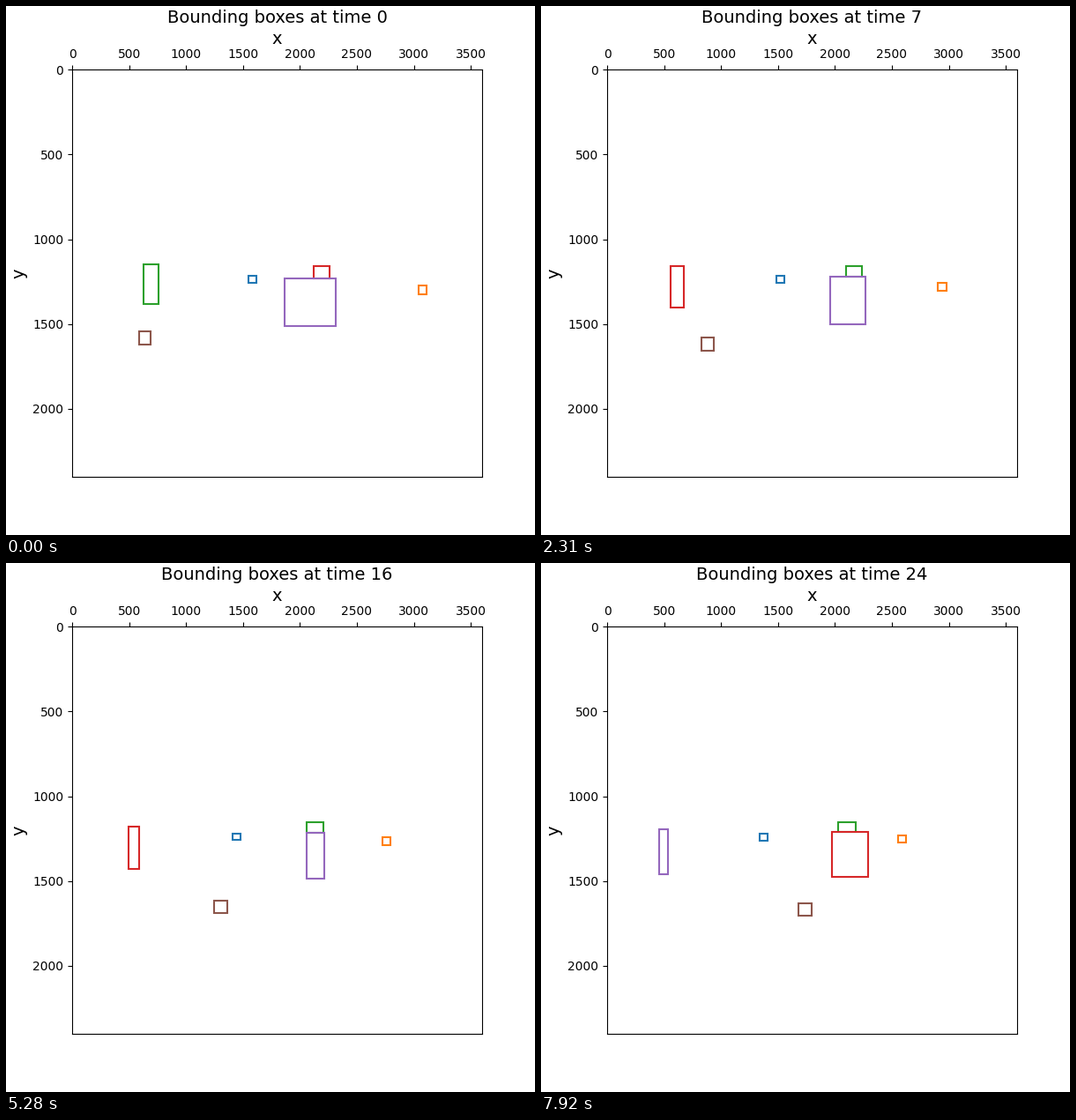
Write a matplotlib script that moves like this. It is 600 px wide and 600 px high and loops after 8 s.

```python
import numpy as np
import matplotlib.pyplot as plt
from matplotlib.animation import FuncAnimation
from matplotlib.patches import Rectangle

STEP_MS = 330      # how long each time step stays
TICK_MS = 40
LOOP_MS = 8000
LAST = 24
W, H = 3600, 2400


def glide(start, end, sag_x, sag_y, u):
    """Box edges (left, right, top, bottom) on an arc from start to end."""
    start, end = np.array(start), np.array(end)
    sag = np.array([sag_x, sag_x, sag_y, sag_y])
    return start + (end - start) * u + 4 * sag * u * (1 - u)


def blue(u):
    return glide((275, 284, 306, 313.8), (247.6, 256.6, 307, 314.8), 0, -0.1, u)


def orange(u):
    return glide((467.8, 477.4, 317.4, 326.6), (404.7, 413.6, 308.9, 317.2),
                 1.1, -0.7, u)


def tall(u):
    return glide((156.2, 173.3, 293.1, 338), (133.6, 144, 302, 352.6),
                 -2.9, -0.55, u)


def brown(u):
    box = glide((150.6, 164.4, 368.6, 384.2), (291.6, 307.4, 385.9, 400.4),
                -10.5, 2.7, u)
    box[:2] -= np.sin(2 * np.pi * u)
    return box


def big(u):
    """Narrows at a steady rate, then widens again as it turns."""
    box = glide((316.4, 374.4, 308.5, 363.4), (356.6, 350.8, 304.6, 356.1),
                0, -0.1, u)
    box[0] = min(box[0], 330 + 33.6 * (1 - u))
    box[1] = max(box[1], 371 - 30 * (1 - u))
    return box


def small(u):
    box = glide((349, 367, 295, 309), (337, 357, 294, 305), 0.1, -0.1, u)
    box[3] = big(u)[2]   # hidden below the big box
    return box


TRACKS = [blue, orange, small, big, tall, brown]


def colors(t):
    """Colour order of small, big and tall changes as their ranks swap."""
    mid = "342" if t < 7 else "243" if t < 18 else "234"
    return ["C" + c for c in "01" + mid + "5"]


fig, ax = plt.subplots(figsize=(6, 6), dpi=100)
ax.set_xlim(0, W)
ax.set_ylim(H, 0)
ax.xaxis.tick_top()
ax.xaxis.set_label_position("top")
ax.set_xlabel("x", fontsize=14)
ax.set_ylabel("y", fontsize=14)
title = ax.set_title("Bounding boxes at time 0", fontsize=14)
rects = [ax.add_patch(Rectangle((0, 0), 1, 1, fill=False, lw=1.5))
         for _ in TRACKS]


def draw(i):
    t = min((i * TICK_MS + TICK_MS - 10) // STEP_MS, LAST)
    title.set_text(f"Bounding boxes at time {t}")
    for rect, track, color in zip(rects, TRACKS, colors(t)):
        left, right, top, bottom = track(t / LAST)
        # stage pixels to data units
        rect.set_bounds((left - 75) / 465 * W, (top - 72) / 462 * H,
                        (right - left) / 465 * W, (bottom - top) / 462 * H)
        rect.set_edgecolor(color)
    return [title, *rects]


anim = FuncAnimation(fig, draw, frames=LOOP_MS // TICK_MS, interval=TICK_MS,
                     repeat=True, repeat_delay=0, blit=False)
plt.show()
```
